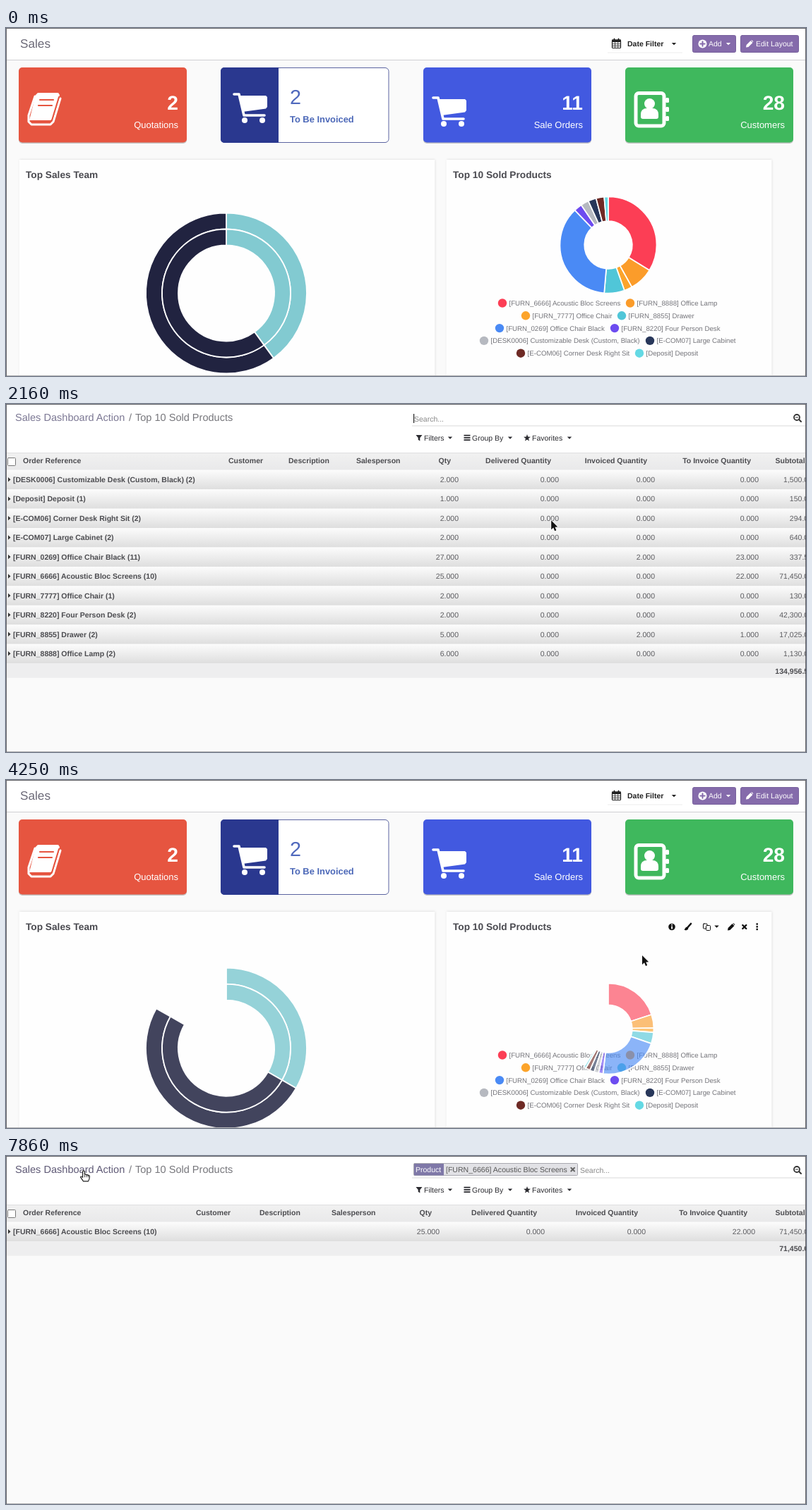
Recreate the animation shown at these times as an HTML page with a canvas. Size 1133x494 px, loop 8.02 s.

```html
<!DOCTYPE html>
<html lang="en">
<head>
<meta charset="utf-8">
<title>Sales dashboard</title>
<style>
html, body { margin: 0; width: 100%; height: 100%; overflow: hidden; background: #fff; }
canvas { display: block; }
</style>
</head>
<body>
<canvas id="stage" width="1133" height="494"></canvas>
<script>
const c = document.getElementById('stage').getContext('2d');
c.textRendering = 'geometricPrecision';
const LOOP = 8020, TAU = Math.PI * 2;
const PURPLE = '#856bab';

const products = [ // name, quantity, colour, legend x, legend row
  ['[FURN_6666] Acoustic Bloc Screens', 25, '#fc3e55', 703, 0],
  ['[FURN_8888] Office Lamp', 6, '#fb9c2a', 884, 0],
  ['[FURN_7777] Office Chair', 2, '#fca42b', 736, 1],
  ['[FURN_8855] Drawer', 5, '#50c6d8', 872, 1],
  ['[FURN_0269] Office Chair Black', 27, '#4a8af5', 699, 2],
  ['[FURN_8220] Four Person Desk', 2, '#6d4cf0', 862, 2],
  ['[DESK0006] Customizable Desk (Custom, Black)', 2, '#b6b9c0', 677, 3],
  ['[E-COM07] Large Cabinet', 2, '#28375a', 912, 3],
  ['[E-COM06] Corner Desk Right Sit', 2, '#6e2a25', 729, 4],
  ['[Deposit] Deposit', 1, '#64d9e4', 897, 4]
];
const team = [[40, '#82cad1'], [60, '#212340']];

const allRows = [
  ['[DESK0006] Customizable Desk (Custom, Black) (2)', 2, 0, 0, 0, '1,500.00'],
  ['[Deposit] Deposit (1)', 1, 0, 0, 0, '150.00'],
  ['[E-COM06] Corner Desk Right Sit (2)', 2, 0, 0, 0, '294.00'],
  ['[E-COM07] Large Cabinet (2)', 2, 0, 0, 0, '640.00'],
  ['[FURN_0269] Office Chair Black (11)', 27, 0, 2, 23, '337.50'],
  ['[FURN_6666] Acoustic Bloc Screens (10)', 25, 0, 0, 22, '71,450.00'],
  ['[FURN_7777] Office Chair (1)', 2, 0, 0, 0, '130.00'],
  ['[FURN_8220] Four Person Desk (2)', 2, 0, 0, 0, '42,300.00'],
  ['[FURN_8855] Drawer (2)', 5, 0, 2, 1, '17,025.00'],
  ['[FURN_8888] Office Lamp (2)', 6, 0, 0, 0, '1,130.00']
];
const fullTable = { rows: allRows, total: '134,956.50', left: [315, 400, 496], right: [641, 783, 919, 1066] };
const oneTable = { rows: [allRows[5]], total: '71,450.00', left: [269, 359, 461], right: [614, 763, 906, 1061] };

const pointerPath = [ // time, x, y
  [400, 1010, 520], [1360, 943, 203], [1900, 943, 203], [2800, 98, 16], [3440, 98, 16],
  [4250, 901, 249], [4600, 901, 249], [5050, 895, 281], [5900, 895, 281],
  [6580, 267, 135], [7180, 110, 21], [LOOP, 110, 21]
];

const clamp = x => Math.max(0, Math.min(1, x));
const easeOut = x => 1 - (1 - clamp(x)) ** 4;

function tick(t) {
  if (t >= 3600 && t < 3930) return 3600;
  if (t >= 5210 && t < 5540) return 5210;
  const start = [5620, 5540, 3930, 80, 0].find(s => s <= t);
  return start + Math.floor((t - start) / 160) * 160;
}

function pointerAt(t) {
  const i = pointerPath.findIndex(k => k[0] > t);
  if (i < 1) return null;
  const [t0, x0, y0] = pointerPath[i - 1], [t1, x1, y1] = pointerPath[i];
  const p = (t - t0) / (t1 - t0), e = p * p * (3 - 2 * p);
  return { x: x0 + (x1 - x0) * e, y: y0 + (y1 - y0) * e };
}

function text(s, x, y, size, color, bold, align = 'left') {
  c.font = `${bold ? 'bold ' : ''}${size}px "Liberation Sans", Arial, sans-serif`;
  c.textAlign = align;
  c.fillStyle = color;
  c.fillText(s, x, y);
}
function rect(x, y, w, h, color) { c.fillStyle = color; c.fillRect(x, y, w, h); }
function box(x, y, w, h, r, fill, stroke, width = 1) {
  c.beginPath();
  c.roundRect(x, y, w, h, r);
  if (fill) { c.fillStyle = fill; c.fill(); }
  if (stroke) { c.strokeStyle = stroke; c.lineWidth = width; c.stroke(); }
}
function disc(x, y, r, color) {
  c.beginPath(); c.arc(x, y, r, 0, TAU);
  c.fillStyle = color; c.fill();
}
function trace(pts) {
  c.beginPath();
  for (let i = 0; i < pts.length; i += 2) c.lineTo(pts[i], pts[i + 1]);
}
function poly(color, ...pts) { trace(pts); c.closePath(); c.fillStyle = color; c.fill(); }
function line(color, width, ...pts) {
  trace(pts);
  c.strokeStyle = color; c.lineWidth = width;
  c.lineCap = c.lineJoin = 'round';
  c.stroke();
}
const caret = (x, y, color) => poly(color, x - 3.2, y - 1.6, x + 3.2, y - 1.6, x, y + 1.8);
function at(x, y, draw) { c.save(); c.translate(x, y); draw(); c.restore(); }

function cart(x, y) {
  at(x, y, () => {
    line('#fff', 3.6, 2, 2, 9, 2, 16, 32, 45, 32);
    poly('#fff', 10, 4, 47, 4, 49, 6, 49, 20, 47, 22.5, 14, 27);
    disc(17, 39, 4, '#fff');
    disc(42, 39, 4, '#fff');
  });
}
function book(color) {
  line('#fff', 3, 41, 97, 32, 124, 32, 133, 36, 137, 63, 137, 67, 133, 77, 100);
  poly('#fff', 45, 92, 74, 92, 76, 95, 66, 129, 63, 131, 33, 131, 42, 95);
  line(color, 2.2, 48, 102, 67, 102);
  line(color, 2.2, 46, 110, 65, 110);
  line(color, 2, 37, 133.5, 62, 133.5, 65, 131, 75, 98);
}
function addressBook() {
  box(892, 92.5, 40, 46.5, 4, null, '#fff', 5);
  for (const y of [99, 112, 125]) box(934, y, 5, 7, 1.5, '#fff');
  disc(911.5, 107.5, 7.5, '#fff');
  box(899, 114, 25, 15, [8, 8, 3, 3], '#fff');
}
function pencil(x, y, color) {
  at(x, y, () => {
    poly(color, -5, 5, -4.4, 1.6, 1.6, -4.4, 4.4, -1.6, -1.6, 4.4);
    poly(color, 2.3, -5, 3.4, -5.2, 5.2, -3.4, 5, -2.3);
  });
}
function calendar() {
  box(858.5, 17, 12, 11.5, 1, null, '#222', 1.2);
  rect(858, 16.5, 13, 3.5, '#222');
  for (const x of [861.5, 867.5]) line('#222', 1.8, x, 15.5, x, 18);
  for (const x of [862.5, 866.7]) line('#222', .8, x, 20, x, 28);
  for (const y of [22.7, 25.5]) line('#222', .8, 859, y, 870, y);
}

function tile(x, color, value, label) {
  box(x, 57, 238, 107, 5, 'rgba(0,0,0,.22)');
  box(x, 56, 238, 106.5, 5, color);
  text(value, x + 226, 116, 28.2, '#fff', true, 'right');
  text(label, x + 226, 141.5, 13, '#fff', false, 'right');
}

function donut(data, x, y, r0, r1, sweep, border, hot) {
  const total = data.reduce((s, d) => s + d[0], 0);
  let a = -TAU / 4;
  data.forEach(([n, color], i) => {
    const b = a + n / total * TAU * sweep;
    c.beginPath();
    c.arc(x, y, r1, a, b);
    c.arc(x, y, r0, b, a, true);
    c.closePath();
    c.globalAlpha = .1 + .9 * sweep;
    c.fillStyle = i === hot ? '#fd540f' : color;
    c.fill();
    c.globalAlpha = 1;
    c.strokeStyle = '#fff'; c.lineWidth = border; c.lineJoin = 'bevel';
    c.stroke();
    a = b;
  });
}

function toolbar(focus) {
  const k = '#111';
  disc(943, 208.5, 4.8, k);
  rect(942.2, 207.5, 1.8, 4, '#fff');
  rect(942.2, 204.8, 1.8, 1.6, '#fff');
  if (focus) box(933.5, 195.5, 20, 26, 0, null, '#f0997c', 1.2);
  line(k, 2.6, 970, 204, 966, 208.5);
  poly(k, 966.5, 208, 966, 212, 963, 213.5, 960.5, 212.5, 963, 209);
  box(987.5, 204, 5.5, 7, 1, '#fff', k);
  box(991.5, 206.5, 6, 7, 1, '#fff', k);
  caret(1006.5, 208, k);
  pencil(1027, 208.5, k);
  line(k, 2.4, 1043.3, 206, 1048.3, 211);
  line(k, 2.4, 1048.3, 206, 1043.3, 211);
  for (const y of [204.5, 208.3, 212]) rect(1062.5, y - 1.2, 2.4, 2.4, k);
}

function tooltip(alpha) {
  c.globalAlpha = alpha;
  box(712, 267, 180, 33.5, 5, 'rgba(0,0,0,.8)');
  poly('rgba(0,0,0,.8)', 892, 279, 897, 283.5, 892, 288);
  text('Ordered Quantity : 25', 717, 280, 9.7, '#fff', true);
  rect(717, 286, 10.5, 10.5, '#fff');
  rect(718, 287, 8.5, 8.5, '#fd540f');
  text(products[0][0], 728, 295, 9.7, '#fff');
  c.globalAlpha = 1;
}

function dashboard(t, p, overIcon) {
  rect(0, 0, 1133, 494, '#fafafa');
  rect(0, 0, 1133, 45, '#fff');
  rect(0, 45, 1133, 1, '#cfcfd2');
  text('Sales', 20, 28, 17.2, '#6c6a78');
  calendar();
  text('Date Filter', 880, 26, 10.5, '#222', true);
  caret(946, 22.5, '#222');
  rect(852, 34.5, 106, 1, '#eee');
  box(972.5, 10.5, 61, 24, 2, PURPLE, '#77609c');
  box(1040.5, 10.5, 82, 24, 2, PURPLE, '#77609c');
  disc(986.5, 22.5, 6, '#fff');
  line(PURPLE, 2, 983.3, 22.5, 989.7, 22.5);
  line(PURPLE, 2, 986.5, 19.3, 986.5, 25.7);
  text('Add', 995, 26, 10.5, '#fff');
  caret(1023, 22.5, '#fff');
  pencil(1053, 22.5, '#fff');
  text('Edit Layout', 1062, 26, 10.5, '#fff');

  const red = '#e65540', navy = '#2a388f';
  tile(18, red, '2', 'Quotations');
  tile(591, '#4259e0', '11', 'Sale Orders');
  tile(877, '#3fb85d', '28', 'Customers');
  book(red);
  cart(603, 97);
  addressBook();
  box(304.5, 56.5, 237.5, 106, 5, '#fff', '#5a63a0');
  box(304, 56, 82, 107, [5, 0, 0, 5], navy);
  cart(321, 92);
  text('2', 402, 108, 28.8, '#5069bd');
  text('To Be Invoiced', 402, 133.5, 12.9, '#4c68b8', true);

  c.save();
  c.shadowColor = 'rgba(0,0,0,.16)';
  c.shadowBlur = 3;
  rect(18.5, 187, 589, 320, '#fefefe');
  rect(623.5, 187, 461, 306, '#fefefe');
  c.restore();
  text('Top Sales Team', 28, 213, 13.7, '#4a4a50', true);
  text('Top 10 Sold Products', 633, 213, 13.7, '#4a4a50', true);

  // Charts grow again each time the page is opened from the list.
  const e1 = t < 3930 ? 1 : easeOut((t - 3890) / 1000);
  const e2 = t < 3930 ? 1 : easeOut((t - 4050) / 1000);
  const y1 = 376.5 + 25 * (1 - e1);
  donut(team, 312, y1, 91, 114, e1, 1.8);
  donut(team, 312, y1, 68, 91, e1, 1.8);

  for (const [name, , color, x, row] of products) {
    const y = 390.5 + row * 17.8;
    disc(x, y, 6.2, color);
    text(name, x + 9.5, y + 3.5, 9.7, '#74747a');
  }
  const hot = t >= 4890 ? 0 : -1;
  if (e2 > 0) donut(products.map(d => [d[1], d[2]]), 853, 308 + 110 * (1 - e2), 33.8, 68.5 - 10 * (1 - e2), e2, 1.7, hot);

  if (p && p.x > 623 && p.x < 1085 && p.y > 187) toolbar(overIcon);
  if (hot === 0) tooltip(clamp((t - 4790) / 260));
}

function searchArea(chip) {
  rect(575, 30.5, 558, 1, '#dadada');
  if (chip) {
    box(577.5, 10.5, 232, 17, 1, '#e2e2e6', '#a9a9b0');
    rect(578, 11, 42, 16.5, '#7f78a8');
    text('Product', 580, 23, 10.5, '#fff');
    text(products[0][0], 623, 22.8, 10.55, '#555');
    line('#666', 2, 800.3, 16.8, 805, 21.5);
    line('#666', 2, 805, 16.8, 800.3, 21.5);
    text('Search...', 813, 24, 10.5, '#888');
  } else {
    rect(577, 14, 1.2, 13, '#222');
    text('Search...', 578, 24.5, 10.5, '#888');
  }
  c.beginPath(); c.arc(1120, 19, 4, 0, TAU);
  c.strokeStyle = '#333'; c.lineWidth = 1.8; c.stroke();
  line('#333', 2, 1123.3, 22.3, 1126, 25);
  line('#333', 1.2, 1118.3, 19, 1121.7, 19);

  const k = '#2b2b30';
  poly(k, 580.5, 44, 589.5, 44, 586.3, 48, 586.3, 52.5, 583.7, 50.8, 583.7, 48);
  for (const y of [44.5, 47.8, 51]) rect(648.5, y - .8, 9, 1.8, k);
  const star = [];
  for (let i = 0; i < 10; i++) {
    const r = i % 2 ? 2.1 : 5.2, a = i * TAU / 10 - TAU / 4;
    star.push(738 + r * Math.cos(a), 48.3 + r * Math.sin(a));
  }
  poly(k, ...star);
  [['Filters', 592, 629], ['Group By', 660, 714], ['Favorites', 745, 798]].forEach(([s, x, cx]) => {
    text(s, x, 52, 10.5, k);
    caret(cx, 48, k);
  });
}

function gradient(y, h, from, to) {
  const g = c.createLinearGradient(0, y, 0, y + h);
  g.addColorStop(0, from);
  g.addColorStop(1, to);
  rect(0, y, 1133, h, g);
}

function list({ rows, total, left, right }, hover) {
  const size = 10.53, ink = '#4c4c50', rowH = 27.45, top = 93.7, headY = 84.2;
  rect(0, 0, 1133, 494, '#fafafa');
  rect(0, 0, 1133, 69, '#fff');
  text('Sales Dashboard Action', 13, 24, 14.55, hover ? '#5f5a76' : '#7c7894');
  text('/', 174, 24, 14.55, '#77777c');
  text('Top 10 Sold Products', 183, 24, 14.55, '#77777c');
  searchArea(rows.length === 1);

  gradient(69, top - 69, '#f1f1f1', '#e9e9ea');
  rect(0, 69, 1133, 1, '#dedee0');
  box(2.5, 76.5, 11, 11, 1, '#fff', '#777');
  text('Order Reference', 24, headY, size, ink, true);
  ['Customer', 'Description', 'Salesperson'].forEach((s, i) => text(s, left[i], headY, size, ink, true));
  ['Qty', 'Delivered Quantity', 'Invoiced Quantity', 'To Invoice Quantity']
    .forEach((s, i) => text(s, right[i] - 11, headY, size, ink, true, 'right'));
  text('Subtotal', 1089.5, headY, size, ink, true);

  rows.forEach(([name, ...cells], i) => {
    const y = top + i * rowH, base = y + 17.3;
    gradient(y, rowH, '#fcfcfc', '#dedede');
    poly('#333', 3, base - 7, 6.5, base - 3.8, 3, base - .6);
    text(name, 10, base, size, ink, true);
    right.forEach((x, k) => text(cells[k].toFixed(3), x, base, size, '#5c5c60', false, 'right'));
    text(cells[4], 1142, base, size, '#5c5c60', false, 'right');
  });
  const end = top + rows.length * rowH;
  rect(0, end, 1133, 20.5, '#eeeeef');
  text(total, 1142, end + 14.3, size, ink, true, 'right');
}

function arrow() {
  const shape = [0, 0, 0, 13, 3, 10.3, 5, 15, 7.2, 14.1, 5.3, 9.5, 9.2, 9.3];
  line('#fff', 1.4, ...shape, 0, 0);
  poly('#111', ...shape);
}
function hand() {
  c.scale(.93, .93);
  c.beginPath();
  c.moveTo(-1.5, 10);
  c.lineTo(-1.5, 1);
  c.quadraticCurveTo(0, -1, 1.5, 1);
  c.lineTo(1.5, 5.5);
  c.quadraticCurveTo(3.2, 4.6, 4.3, 6.2);
  c.quadraticCurveTo(6, 5.4, 6.8, 7);
  c.quadraticCurveTo(9, 6.6, 9, 9);
  c.lineTo(8.5, 12.5);
  c.lineTo(7, 16);
  c.lineTo(-.5, 16);
  c.quadraticCurveTo(-3, 12.5, -4.8, 9.6);
  c.quadraticCurveTo(-4, 7.4, -1.5, 10);
  c.closePath();
  c.fillStyle = '#fff'; c.fill();
  c.strokeStyle = '#222'; c.lineWidth = 1.3; c.lineJoin = 'round'; c.stroke();
  for (const x of [1.5, 4.3, 6.8]) line('#222', .9, x, 6.5, x, 9.5);
}

function windowEdge() {
  rect(0, 493, 1133, 1, '#b4b4b6');
  rect(0, 0, 1133, 1, '#66666a');
  rect(0, 0, 1, 494, '#66666a');
  rect(1132, 0, 1, 494, '#66666a');
}

function draw(time) {
  const t = tick(time), p = pointerAt(t);
  const onList = (t >= 1840 && t < 3930) || t >= 5940;
  const overLink = p && (onList ? p.x > 12 && p.x < 170 && p.y < 28
                                : Math.abs(p.x - 943) < 10 && Math.abs(p.y - 208) < 13);
  if (onList) list(t < 3930 ? fullTable : oneTable, overLink);
  else dashboard(t, p, overLink);
  windowEdge();
  if (p) at(p.x, p.y, overLink ? hand : arrow);
}

const began = performance.now();
function run() {
  draw((performance.now() - began) % LOOP);
  requestAnimationFrame(run);
}
run();
</script>
</body>
</html>
```
